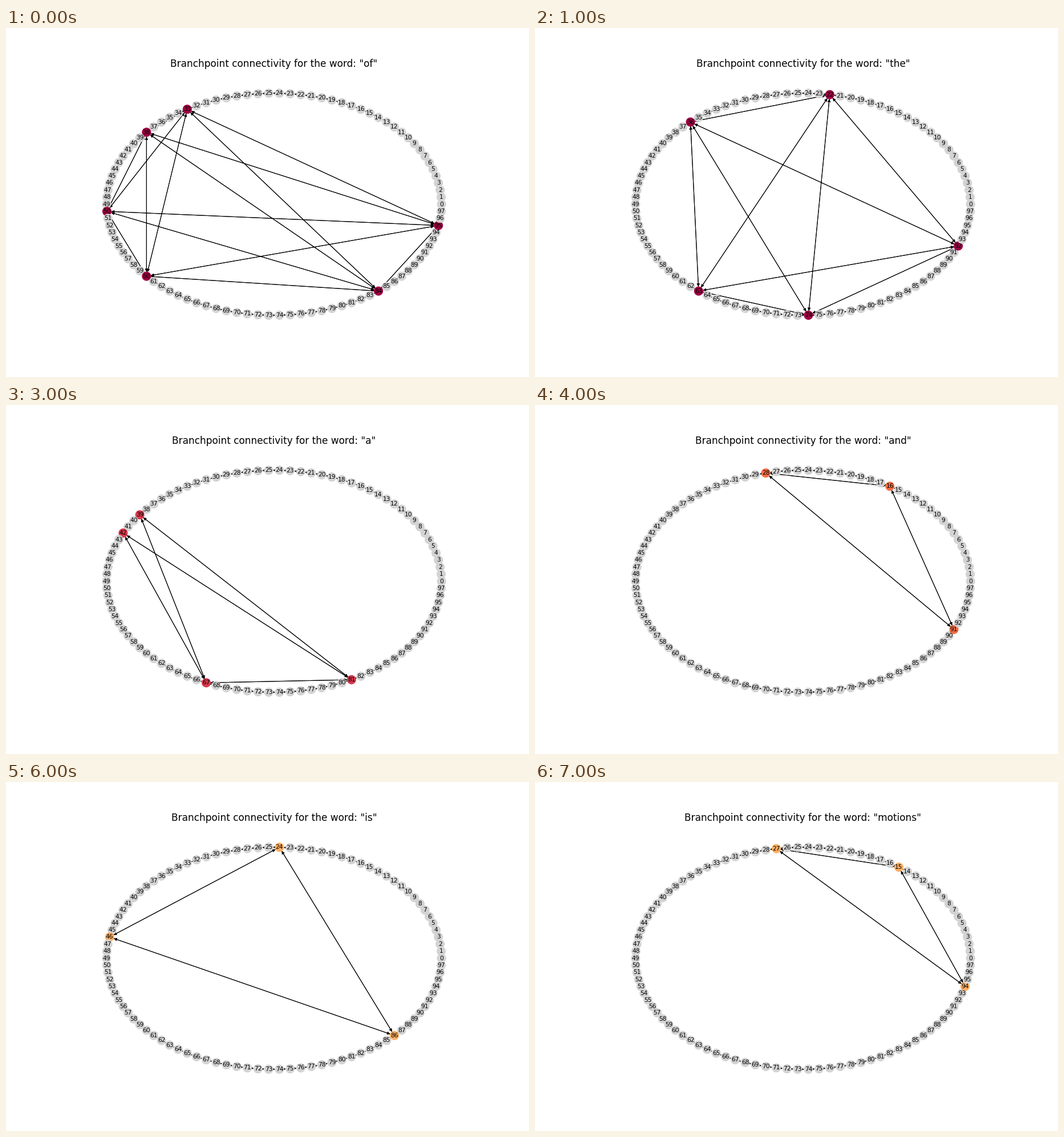
A matplotlib script for the animation above (8000 ms loop, 917 by 611 pixels).

```python
from itertools import permutations

import matplotlib.pyplot as plt
import numpy as np
from matplotlib.animation import FuncAnimation
from matplotlib.patches import FancyArrowPatch

W, H = 917, 611
DPI = 64
K = 76.4 / DPI          # scales point sizes of a 12 x 8 inch layout to this dpi
N = 98
NODE_SIZE = 200
GREY = "lightgrey"

# word, highlight colour, positions of the word in the text
SCENES = [
    ("of", "#9e0142", (33, 38, 50, 60, 84, 95)),
    ("the", "#9e0142", (22, 36, 63, 74, 92)),
    ("as", "#d8394e", (3, 5, 19, 53)),
    ("a", "#d8394e", (39, 42, 67, 81)),
    ("and", "#f46d43", (16, 28, 91)),
    ("in", "#f46d43", (13, 56, 80)),
    ("is", "#fdae61", (24, 46, 86)),
    ("motions", "#fdae61", (15, 27, 94)),
]

plt.rcParams["font.family"] = "DejaVu Sans"
fig = plt.figure(figsize=(W / DPI, H / DPI), dpi=DPI, facecolor="white")
ax = fig.add_axes([0, 0, 1, 1])
ax.set_xlim(0, W)
ax.set_ylim(H, 0)
ax.axis("off")

# ellipse of nodes, counted anticlockwise from the right
angle = 2 * np.pi * np.arange(N) / N
cx, cy = W * 0.5125, H * 0.505
rx, ry = W * 0.775 / 2.42, H * 0.77 / 2.42
pos = np.column_stack([cx + rx * np.cos(angle), cy - ry * np.sin(angle)])


def add_arrow(a, b):
    shrink = np.sqrt(NODE_SIZE) / 2 * K
    arrow = FancyArrowPatch(
        tuple(pos[a]), tuple(pos[b]), arrowstyle="-|>", mutation_scale=10 * K,
        shrinkA=shrink, shrinkB=shrink, linewidth=K, color="black", zorder=1)
    return ax.add_patch(arrow)


for i in range(N - 1):
    add_arrow(i, i + 1)

nodes = ax.scatter(pos[:, 0], pos[:, 1], s=NODE_SIZE * K ** 2,
                   c=[GREY] * N, linewidths=K, zorder=2)
for i, (x, y) in enumerate(pos):
    ax.text(x, y, str(i), fontsize=10 * K, ha="center", va="center", zorder=3)
title = ax.text(cx, 68, "", fontsize=16 * K, ha="center", va="baseline")
chords = []


def update(frame):
    word, color, marked = SCENES[frame]
    while chords:
        chords.pop().remove()
    chords.extend(add_arrow(a, b) for a, b in permutations(marked, 2))
    colors = [color if i in marked else GREY for i in range(N)]
    nodes.set_facecolor(colors)
    nodes.set_edgecolor(colors)
    title.set_text(f'Branchpoint connectivity for the word: "{word}"')
    return [nodes, title, *chords]


anim = FuncAnimation(fig, update, frames=len(SCENES), interval=1000,
                     repeat=True, repeat_delay=0, blit=False)
plt.show()
```
